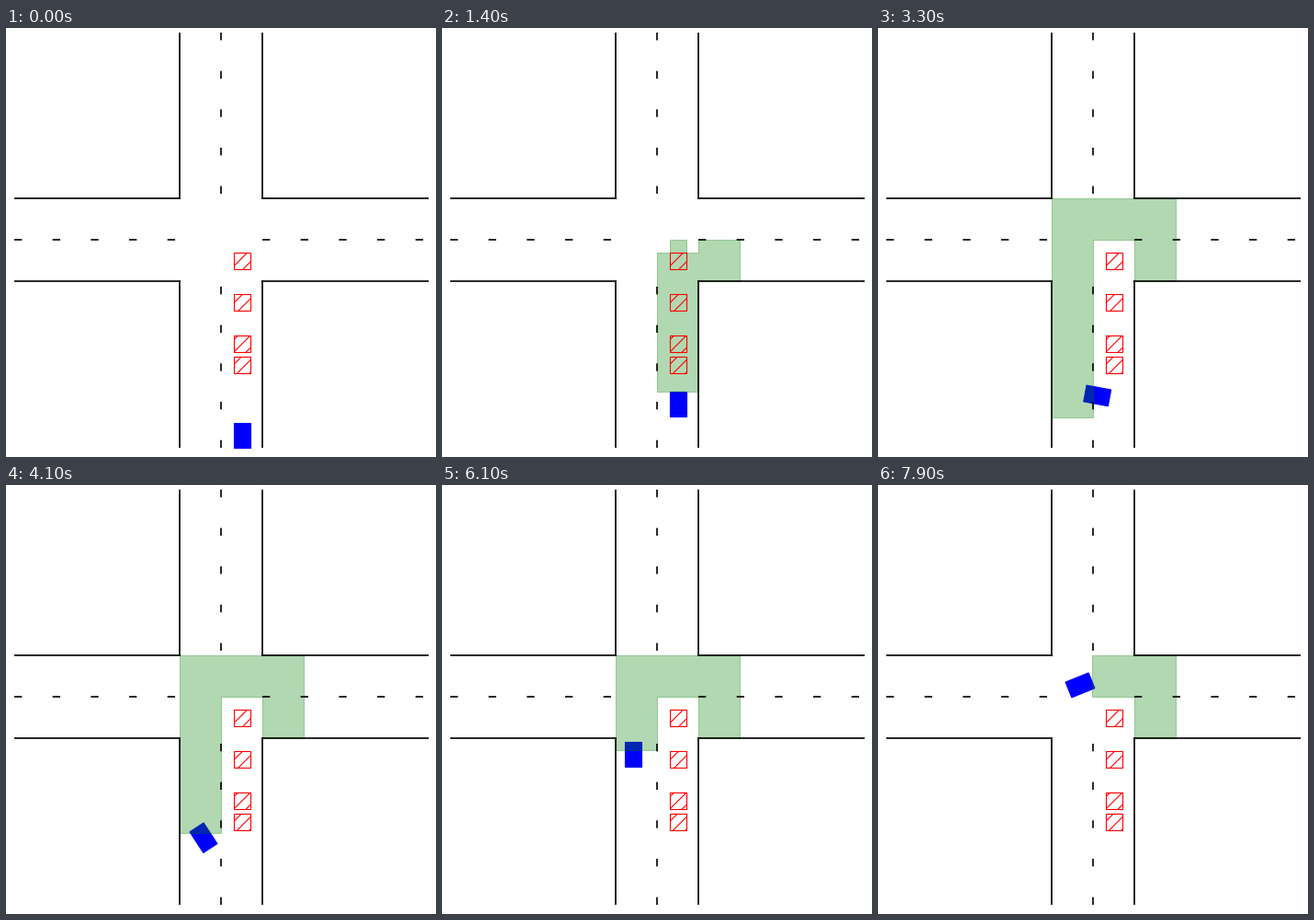
A matplotlib script that plays this animation: 468 px wide and 466 px high, repeating every 8000 ms.

```python
import numpy as np
import matplotlib.pyplot as plt
from matplotlib.animation import FuncAnimation
from matplotlib.patches import Polygon, Rectangle

W, H, DPI = 468, 466, 80
SIDE = 451              # road map edge in pixels, 100 map units
LEFT, BOTTOM = 8.7, 10.2
FRAMES, INTERVAL = 80, 100
CAR_LEN, CAR_WID = 6, 4

# The view refreshes in bursts: first tick, last tick, number of refreshes.
BURSTS = [(3, 11, 6), (14, 24, 8), (25, 35, 7), (36, 45, 7),
          (47, 57, 9), (59, 69, 8), (71, 79, 7)]
REFRESH = np.concatenate(
    [[0]] + [np.floor(np.linspace(*burst)) for burst in BURSTS])

# Key poses of the car: tick, x, y, heading in degrees.
KEYS = [(3, 55, 3, 90), (11, 55, 10.5, 90), (25, 55, 10.5, 90),
        (33, 51, 12.5, 169.5), (45, 44.2, 20.3, 90),
        (69, 44.2, 44.3, 90), (79, 46.85, 52.85, 22)]

fig = plt.figure(figsize=(W / DPI, H / DPI), dpi=DPI, facecolor="white")
ax = fig.add_axes([LEFT / W, BOTTOM / H, SIDE / W, SIDE / H])
ax.set(xlim=(0, 100), ylim=(0, 100))
ax.axis("off")


def draw_roads():
    dash = dict(color="k", lw=1.5, ls=(0, (5, 20)))
    for start, end in ((0, 40), (100, 60)):
        for side in (40, 60):
            ax.plot([start, end], [side, side], "k", lw=1.5)
            ax.plot([side, side], [start, end], "k", lw=1.5)
        ax.plot([50, 50], [start, end], **dash)
        ax.plot(sorted([start, end]), [50, 50], **dash)


def direction(degrees):
    a = np.radians(degrees)
    return np.array([np.cos(a), np.sin(a)])


def pose(t):
    """Hermite curve between key poses, tangent to the headings."""
    t = max(t, KEYS[0][0])
    k = max(k for k in range(len(KEYS) - 1) if KEYS[k][0] <= t)
    (t0, *p0, h0), (t1, *p1, h1) = KEYS[k:k + 2]
    p0, p1 = np.array(p0), np.array(p1)
    s = (t - t0) / (t1 - t0)
    chord = np.hypot(*(p1 - p0))
    blend = s * s * (3 - 2 * s)
    mid = (p0 + blend * (p1 - p0)
           + chord * s * (1 - s) ** 2 * direction(h0)
           - chord * s * s * (1 - s) * direction(h1))
    return mid, h0 + s * (h1 - h0)


def car_corners(t):
    mid, heading = pose(t)
    ahead = direction(heading) * CAR_LEN / 2
    aside = direction(heading + 90) * CAR_WID / 2
    return [mid + ahead + aside, mid + ahead - aside,
            mid - ahead - aside, mid - ahead + aside]


def straight_on(bottom):
    return [(50, bottom), (60, bottom), (60, 47), (50, 47)]


def straight_then_right():
    return [(50, 13.5), (60, 13.5), (60, 40), (70, 40), (70, 50), (60, 50),
            (60, 47), (57, 47), (57, 50), (53, 50), (53, 47), (50, 47)]


def swerve(top):
    return [(40, 7.3), (50, 7.3), (50, 13.5), (60, 13.5), (60, 17.5),
            (50, 17.5), (50, top), (40, top)]


def detour(bottom):
    goal = [(50, 50), (60, 50), (60, 40), (70, 40), (70, 60)]
    if bottom > 50:
        return [(49.8, 50)] + goal + [(49.8, 60)]
    return [(40, bottom), (50, bottom)] + goal + [(40, 60)]


def plan(t):
    """Outline of the planned route, or None before planning starts."""
    if t < 3:
        return None
    if t < 14:
        return straight_on(6)
    if t < 15:
        return straight_then_right()
    if t < 25:
        return swerve(min(60, 17.6 + 5 * (t - 14)))
    passed = max(0, (t - 29) // 10)
    return detour(7.3 + 10 * passed)


draw_roads()
car = ax.add_patch(Polygon(car_corners(0), color="blue", clip_on=False))
area = ax.add_patch(Polygon(straight_on(6), color="green", alpha=0.3,
                            visible=False))
for y in (18, 23, 33, 43):
    ax.add_patch(Rectangle((53, y), 4, 4, fill=False, edgecolor="red",
                           hatch="//"))


def update(i):
    t = REFRESH[REFRESH <= i].max()
    car.set_xy(car_corners(t))
    route = plan(t)
    area.set_visible(route is not None)
    if route is not None:
        area.set_xy(route)
    return car, area


anim = FuncAnimation(fig, update, frames=FRAMES, interval=INTERVAL,
                     init_func=lambda: update(0), repeat=True,
                     repeat_delay=0, blit=False)
plt.show()
```
